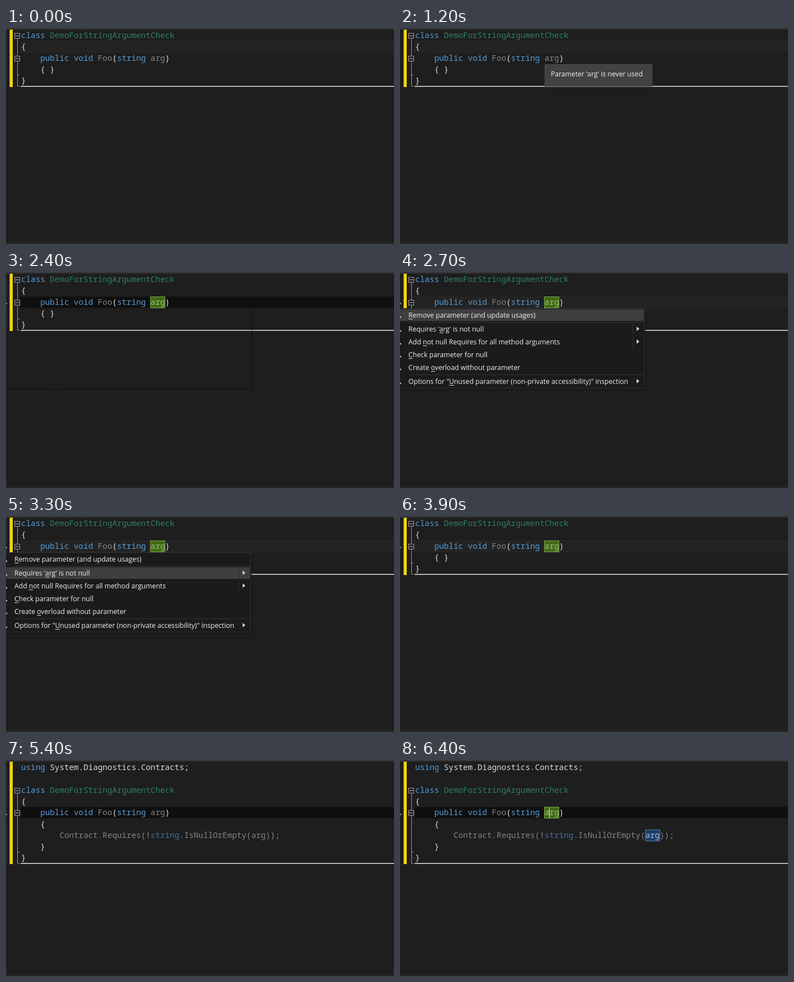
Write an HTML page with a canvas that moves like this. It is 692 px wide and 388 px high and loops after 6600 ms.

```html
<!DOCTYPE html>
<html lang="en">
<head>
<meta charset="utf-8">
<style>
  html, body { margin: 0; width: 100%; height: 100%; overflow: hidden; background: #1e1e1e; }
  canvas { display: block; }
</style>
</head>
<body>
<canvas id="stage" width="692" height="388"></canvas>
<script>
const ctx = document.getElementById('stage').getContext('2d');
const LOOP = 6600, LINE = 20.3, LEFT = 27;
const CODE_FONT = '14.25px "Noto Sans Mono", monospace';
const UI_FONT = '12.17px "Open Sans", sans-serif';
const COLORS = {
  k: '#569cd6', t: '#2d7f6a', p: '#dcdcdc', g: '#848484', d: '#436f96',
  green: '#9db684', blue: '#a9bdd4'
};

const clamp = x => Math.max(0, Math.min(1, x));
const between = (t, from, to) => t >= from && t < to;
const rowTop = row => Math.floor(3.5 + row * LINE);

function rect(x, y, w, h, color) {
  ctx.fillStyle = color;
  ctx.fillRect(x, y, w, h);
}

function box(x, y, w, h, fill, border) {
  rect(x, y, w, h, border);
  rect(x + 1, y + 1, w - 2, h - 2, fill);
}

function withAlpha(alpha, draw) {
  if (alpha <= 0) return;
  ctx.save();
  ctx.globalAlpha = alpha;
  draw();
  ctx.restore();
}

// A code line is a list of [color key, text] runs.
function codeLine(row, indent, runs) {
  ctx.font = CODE_FONT;
  let x = LEFT + indent * ctx.measureText(' ').width;
  for (const [color, text] of runs) {
    ctx.fillStyle = COLORS[color];
    ctx.fillText(text, x, 18 + row * LINE);
    x += ctx.measureText(text).width;
  }
}

function foldBox(y) {
  box(15, y - 5, 10, 10, '#1e1e1e', '#a0a0a0');
  rect(17, y - 0.5, 6, 1, '#d0d0d0');
}

function margin(classRow, methodRow, methodEnd, bottom) {
  rect(6.5, 3, 5.5, bottom - 2, '#f3d50c');
  const top = 14 + classRow * LINE;
  rect(20, top, 1, bottom - top, '#999');
  rect(20, methodEnd, 4, 1, '#999');
  rect(20, bottom - 1, 4, 1, '#999');
  foldBox(Math.round(top));
  foldBox(Math.round(14 + methodRow * LINE));
  rect(26, bottom - 1, 666, 1.5, '#e4e4e4');
  rect(27, bottom, 8, 1, '#8a8a8a');
}

function currentRow(row, active) {
  box(26, rowTop(row), 668, 21, active ? '#0f0f0f' : '#232323', active ? '#151515' : '#282828');
}

function bulb(y) {
  rect(0, y, 1, 3, '#a8a8a8');
  rect(1, y + 1, 1, 2, '#686868');
}

function tooltip() {
  box(258, 65, 192, 40, '#424245', '#4d4d50');
  ctx.font = UI_FONT;
  ctx.fillStyle = '#f1f1f1';
  ctx.fillText("Parameter 'arg' is never used", 269, 87);
}

// "_" precedes the underlined access key.
const MENU = [
  { y: 82, label: '_Remove parameter (and update usages)' },
  { y: 107, label: "Requires '_arg' is not null", submenu: true, split: true },
  { y: 130, label: 'Add _not null Requires for all method arguments', submenu: true, split: true },
  { y: 153, label: '_Check parameter for null' },
  { y: 176, label: 'Create _overload without parameter' },
  { y: 201, label: 'Options for "_Unused parameter (non-private accessibility)" inspection', submenu: true }
];

function menuItem({ y, label, submenu, split }) {
  const [before, after] = label.split('_');
  ctx.fillStyle = ctx.strokeStyle = '#f1f1f1';
  ctx.fillText(before + after, 15, y);
  const x = 15 + ctx.measureText(before).width;
  rect(x, y + 2, ctx.measureText(after[0]).width, 1, '#d8d8d8');
  ctx.lineWidth = 1.5;
  ctx.beginPath();
  ctx.moveTo(-1, y - 3);
  ctx.lineTo(2, y);
  ctx.stroke();
  if (split) rect(415, y - 15, 1, 21, '#2f2f32');
  if (submenu) {
    ctx.fillStyle = '#cfcfcf';
    ctx.beginPath();
    ctx.moveTo(422, y - 9);
    ctx.lineTo(427, y - 5);
    ctx.lineTo(422, y - 1);
    ctx.fill();
  }
}

function menu(selected) {
  box(-1, 65, 438, 144, '#1b1b1c', '#333337');
  rect(14, 90, 421, 1, '#333337');
  rect(14, 184, 421, 1, '#333337');
  rect(0, MENU[selected].y - 15, 435, 21, '#3e3e40');
  ctx.font = UI_FONT;
  MENU.forEach(menuItem);
}

function menuShadow() {
  const shade = 'rgba(0, 0, 0, 0.2)';
  rect(437, 70, 3, 142, shade);
  rect(0, 209, 437, 3, shade);
}

function method(row, marked) {
  if (marked) box(257, rowTop(row), 27, 21, '#3f6b12', '#7f9e55');
  codeLine(row, 4, [['k', 'public void '], ['g', 'Foo'], ['p', '('],
    ['k', 'string '], [marked ? 'green' : 'g', 'arg'], ['p', ')']]);
}

function classHeader(row) {
  codeLine(row, 0, [['k', 'class '], ['t', 'DemoForStringArgumentCheck']]);
  codeLine(row + 1, 0, [['p', '{']]);
}

function before(t) {
  const clicked = t >= 1300;
  currentRow(clicked ? 2 : 1, between(t, 1300, 2500));
  margin(0, 2, 84, 105);
  classHeader(0);
  method(2, t >= 2000);
  codeLine(3, 4, [['p', '{ }']]);
  codeLine(4, 0, [['p', '}']]);
  if (t >= 2100) bulb(55);
  if (between(t, 1200, 1600)) withAlpha(clamp((1600 - t) / 300), tooltip);
  if (between(t, 2300, 3900)) {
    withAlpha(clamp((t - 2200) / 200), menuShadow);
    withAlpha(clamp((t - 2400) / 300), () => menu(t < 2800 ? 0 : 1));
  }
}

function after(t) {
  const dimmed = t >= 5000, marked = t >= 6200;
  const plain = dimmed ? 'g' : 'p';
  currentRow(4, true);
  margin(2, 4, 165, 186);
  codeLine(0, 0, [['k', 'using '], ['p', 'System.Diagnostics.Contracts;']]);
  classHeader(2);
  method(4, t < 4900 || marked);
  codeLine(5, 4, [['p', '{']]);
  if (marked) box(437, rowTop(6), 27, 21, '#193c69', '#56799f');
  codeLine(6, 8, [[plain, 'Contract.Requires(!'], [dimmed ? 'd' : 'k', 'string'],
    [plain, '.IsNullOrEmpty('], [marked ? 'blue' : plain, 'arg'], [plain, '));']]);
  codeLine(7, 4, [['p', '}']]);
  codeLine(8, 0, [['p', '}']]);
  bulb(96);
  if (t < 5300 || marked) rect(266, 86, 1, 18, '#e6e6e6');
}

function frame(now) {
  const t = now % LOOP;
  rect(0, 0, 692, 388, '#1e1e1e');
  rect(0, 0, 692, 2.5, '#36363c');
  rect(0, 384, 692, 4, '#242426');
  (t < 4700 ? before : after)(t);
  requestAnimationFrame(frame);
}
requestAnimationFrame(frame);
</script>
</body>
</html>
```
